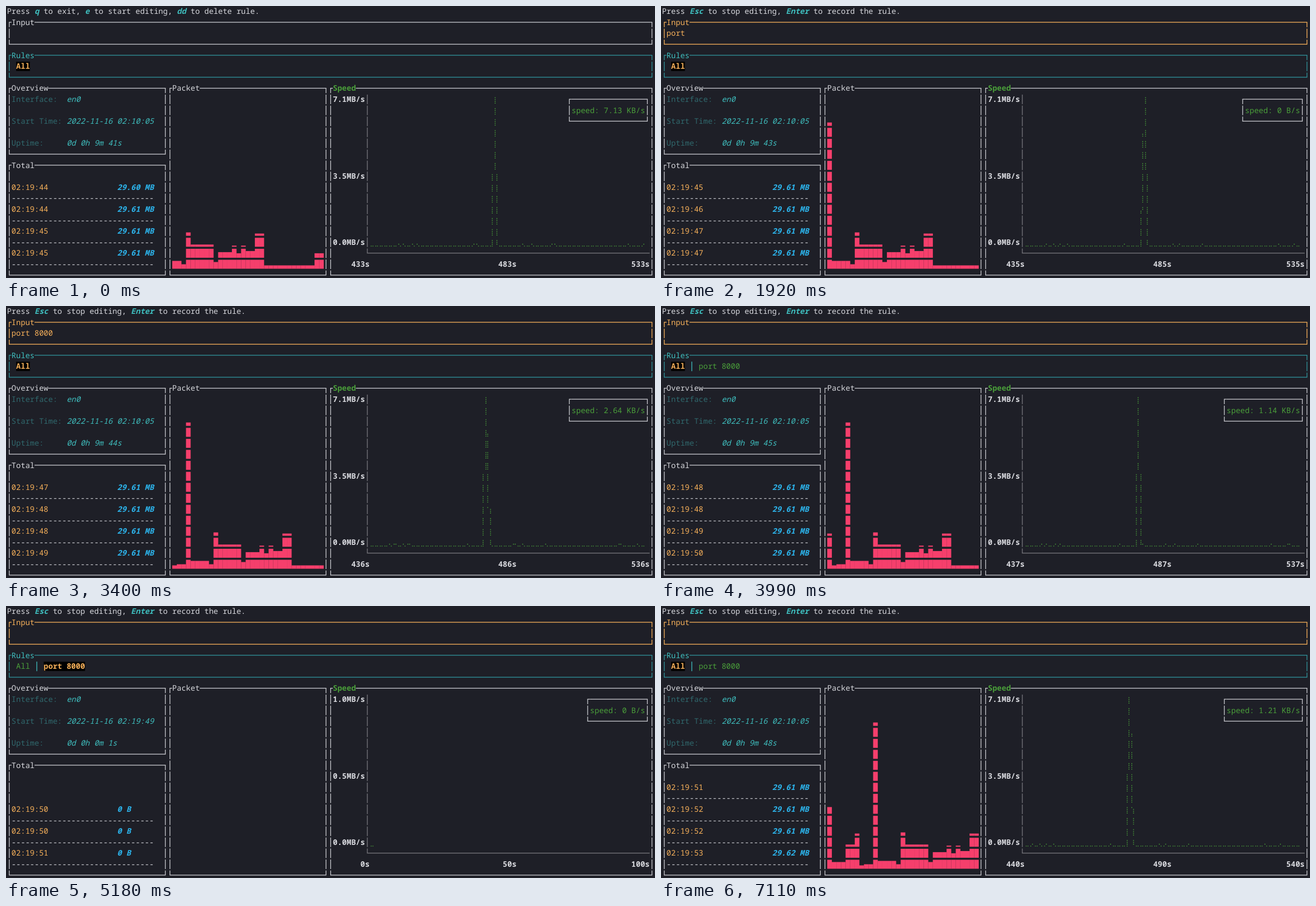
An HTML page with a canvas for the animation above (8 s loop, 1155 by 485 pixels).

```html
<!DOCTYPE html>
<html lang="en">
<head>
<meta charset="utf-8">
<title>Packet monitor</title>
<style>
html, body { margin: 0; width: 100%; height: 100%; overflow: hidden; background: #1e1f27; }
canvas { display: block; }
</style>
</head>
<body>
<canvas id="stage" width="1155" height="485"></canvas>
<script>
const LOOP = 8000;
const CW = 8.17, RH = 19.6;
const ctx = document.getElementById('stage').getContext('2d');

const C = {
  bg: '#1e1f27', text: '#d8d9de', line: '#c8c9ce', axis: '#77787d',
  cyan: '#3fbfbf', teal: '#30939b', label: '#30686d', orange: '#f6b05a',
  green: '#4a9f3a', blue: '#2cb4ec', pink: '#f63f6c'
};

// cell geometry
const left = col => 1.7 + col * CW;
const midX = col => left(col) + CW / 2;
const midY = row => 9.4 + row * RH;

const fill = n => v => Array(n).fill(v);

// packet bars in eighths of a row, newest first
const BARS = [46, 6, 6, 6, 18, 18, 26, 3, 4, 4, 107, ...fill(4)(7), 4, 27, ...fill(5)(18), 6,
  13, 13, 13, 17, 12, 17, 14, 14, 26, 26, ...fill(11)(3), 12, 12];
const NEWEST = 13, BAR_COUNT = 33;

// seconds past 02:19 of each total, beginning with sample -3
const SECONDS = [44, 44, 45, 45, 46, 47, 47, 48, 48, 49, 50, 50, 51, 51, 52, 52, 53];
const RULE_SECONDS = [50, 50, 51, 51, 52, 52];

const PEAK = 478;
const BUMPS = new Set([443, 445, 448, 450, 471, 479, 488, 491, 499, 526, 532]);

// [time, value] steps
const SAMPLE = [[0, 0], [590, 1], [890, 2], [1480, 3], [2220, 4], [2660, 5], [3400, 6], [3990, 7], [7110, 13]];
const UPTIME = [[0, 41], [890, 42], [1920, 43], [2960, 44], [3990, 45], [7110, 48]];
const WINDOW = [[0, 433], [590, 434], [1480, 435], [2660, 436], [3850, 437], [7110, 440]];
const SPEED = [[0, '7.13 KB/s'], [590, '0 B/s'], [2660, '2.64 KB/s'], [3850, '1.14 KB/s'], [7110, '1.21 KB/s']];
const TYPED = [[0, 0], [1180, 1], [1330, 2], [1480, 3], [1770, 4], [1920, 5], [2510, 6], [2660, 7],
  [3110, 8], [3400, 9], [3550, 0]];
const RULE_TOTALS = [[0, 1], [4740, 2], [5180, 3], [5780, 4], [6370, 5], [6810, 6]];
const RULE_UPTIME = [[0, 0], [4740, 1], [5480, 2], [6520, 3]];
const RULE_POINTS = [[0, 1], [5180, 2], [6070, 3]];
const RULE = 'port 8000';

function at(steps, t) {
  let value = steps[0][1];
  for (const [time, v] of steps) if (t >= time) value = v;
  return value;
}

function text(str, col, row, color, style = '') {
  ctx.font = style + ' 13.617px "Noto Sans Mono", "DejaVu Sans Mono", monospace';
  ctx.fillStyle = color;
  [...str].forEach((ch, i) => {
    if (ch !== ' ') ctx.fillText(ch, left(col + i), midY(row) + 4.7);
  });
  return col + str.length;
}

function hLine(x0, x1, row, color) {
  ctx.fillStyle = color;
  ctx.fillRect(x0, midY(row) - 0.65, x1 - x0, 1.3);
}

function vLine(col, row, color, from = -8.2, to = 8.8) {
  ctx.fillStyle = color;
  ctx.fillRect(midX(col) - 0.65, midY(row) + from, 1.3, to - from);
}

function box(c0, r0, c1, r1, color, title = '', titleColor = color, style = '') {
  hLine(midX(c0) - 0.65, left(c0 + 1), r0, color);
  hLine(left(c0 + 1 + title.length), midX(c1) + 0.65, r0, color);
  hLine(midX(c0) - 0.65, midX(c1) + 0.65, r1, color);
  for (const c of [c0, c1]) {
    vLine(c, r0, color, 0);
    for (let r = r0 + 1; r < r1; r++) vLine(c, r, color);
    vLine(c, r1, color, -8.2, 0);
  }
  text(title, c0 + 1, r0, titleColor, style);
}

function header(editing) {
  const parts = editing
    ? ['Press ', 'Esc', ' to stop editing, ', 'Enter', ' to record the rule.']
    : ['Press ', 'q', ' to exit, ', 'e', ' to start editing, ', 'dd', ' to delete rule.'];
  let col = 0;
  parts.forEach((p, i) => {
    col = i % 2 ? text(p, col, 0, C.cyan, 'italic bold') : text(p, col, 0, C.text);
  });
}

function tab(name, col, active) {
  if (active) {
    ctx.fillStyle = '#000';
    ctx.fillRect(left(col), midY(5) - 8, name.length * CW, 16.5);
  }
  text(name, col, 5, active ? C.orange : C.green, active ? 'bold' : '');
}

function rules(added, second) {
  box(0, 4, 140, 6, C.teal, 'Rules', C.cyan);
  tab('All', 2, !second);
  if (added) {
    vLine(6, 5, C.cyan);
    tab(RULE, 8, second);
  }
}

function overview(start, uptime) {
  box(0, 7, 34, 13, C.line, 'Overview', C.text);
  const rows = [['Interface:', 'en0'], ['Start Time:', '2022-11-16 ' + start], ['Uptime:', uptime]];
  rows.forEach(([name, value], i) => {
    text(name, 1, 8 + 2 * i, C.label);
    text(value, 13, 8 + 2 * i, C.cyan, 'italic');
  });
}

// rows hold [seconds, amount], the last one sits at the bottom
function totals(rows) {
  box(0, 14, 34, 24, C.line, 'Total', C.text);
  rows.forEach(([sec, amount], i) => {
    const row = 24 - 2 * (rows.length - i);
    text('02:19:' + sec, 1, row, C.orange);
    text(amount, 24, row, C.blue, 'italic bold');
    text('-'.repeat(31), 1, row + 1, C.text);
  });
}

function packets(bars) {
  box(35, 7, 69, 24, C.line, 'Packet', C.text);
  ctx.fillStyle = C.pink;
  bars.forEach((units, i) => {
    for (let row = 23; units > 0; row--, units -= 8) {
      const h = Math.min(units, 8) * 2;
      ctx.fillRect(left(36 + i), midY(row) + 8.3 - h, CW + 0.1, h);
    }
  });
}

// braille lattice: two by four dots in a cell
function lattice(points) {
  const dots = new Set();
  const put = (x, y) => dots.add(x + y * 1000);
  points.forEach(p => put(...p));
  for (let i = 1; i < points.length; i++) {
    let [x1, y1] = points[i - 1], [x2, y2] = points[i];
    const dx = x2 - x1, dy = Math.abs(y2 - y1);
    if (dy < dx) {
      let d = 2 * dy - dx;
      for (let x = x1, y = y1; x <= x2; x++) {
        put(x, y);
        if (d > 0) { y += Math.sign(y2 - y1); d -= 2 * dx; }
        d += 2 * dy;
      }
    } else {
      if (y1 > y2) [x1, y1, x2, y2] = [x2, y2, x1, y1];
      let d = 2 * dx - dy;
      for (let x = x1, y = y1; y <= y2; y++) {
        put(x, y);
        if (d > 0) { x += Math.sign(x2 - x1); d -= 2 * dy; }
        d += 2 * dx;
      }
    }
  }
  return dots;
}

function speed(points, top, half, xs, rate) {
  box(70, 7, 140, 24, C.line, 'Speed', C.green, 'bold');
  for (let r = 8; r < 22; r++) vLine(78, r, C.axis);
  vLine(78, 22, C.axis, -8.2, 0);
  hLine(midX(78) - 0.65, left(140), 22, C.axis);
  [[top, 8], [half, 15], ['0.0', 21]].forEach(([n, row]) => text(n + 'MB/s', 71, row, C.text, 'bold'));
  xs.forEach(([n, col]) => text(n + 's', col, 23, C.text, 'bold'));

  ctx.fillStyle = C.green;
  for (const key of lattice(points)) {
    const x = key % 1000, y = Math.floor(key / 1000);
    ctx.beginPath();
    ctx.arc(left(79 + (x >> 1)) + (x & 1 ? 5.9 : 2.8), midY(8 + (y >> 2)) - 2.9 + 3.3 * (y & 3), 0.85, 0, 7);
    ctx.fill();
  }

  const legend = 'speed: ' + rate;
  const col = 139 - legend.length;
  box(col - 1, 8, 139, 10, C.line);
  text(legend, col, 9, C.green);
}

const dotX = i => Math.floor(i * 1.21);
const level = s => s === PEAK ? 0 : BUMPS.has(s) ? 54 : 55;

function allView(t) {
  const n = at(SAMPLE, t), from = at(WINDOW, t);
  overview('02:10:05', '0d 0h 9m ' + at(UPTIME, t) + 's');
  totals([-3, -2, -1, 0].map(k => {
    const id = n + k;
    return [SECONDS[id + 3], id < -2 ? '29.60 MB' : id < NEWEST ? '29.61 MB' : '29.62 MB'];
  }));
  packets(BARS.slice(NEWEST - n, NEWEST - n + BAR_COUNT));
  const points = Array.from({ length: 100 }, (_, i) => [dotX(i), level(from + i)]);
  speed(points, '7.1', '3.5', [[from, 75], [from + 50, 107], [from + 100, 136]], at(SPEED, t));
}

function ruleView(t) {
  overview('02:19:49', '0d 0h 0m ' + at(RULE_UPTIME, t) + 's');
  totals(RULE_SECONDS.slice(0, at(RULE_TOTALS, t)).slice(-4).map(s => [s, '0 B']));
  packets([]);
  const points = Array.from({ length: at(RULE_POINTS, t) }, (_, i) => [dotX(i), 55]);
  speed(points, '1.0', '0.5', [[0, 77], [50, 108], [100, 136]], '0 B/s');
}

function draw(t) {
  const editing = t >= 890;
  const second = t >= 4290 && t < 7110;
  ctx.fillStyle = C.bg;
  ctx.fillRect(0, 0, 1155, 485);
  header(editing);
  box(0, 1, 140, 3, editing ? C.orange : C.line, 'Input', editing ? C.orange : C.text);
  text(RULE.slice(0, at(TYPED, t)), 1, 2, C.orange);
  rules(t >= 3550, second);
  (second ? ruleView : allView)(t);
}

ctx.textRendering = 'geometricPrecision';
const began = performance.now();
function tick() {
  draw((performance.now() - began) % LOOP);
  requestAnimationFrame(tick);
}
tick();
</script>
</body>
</html>
```
